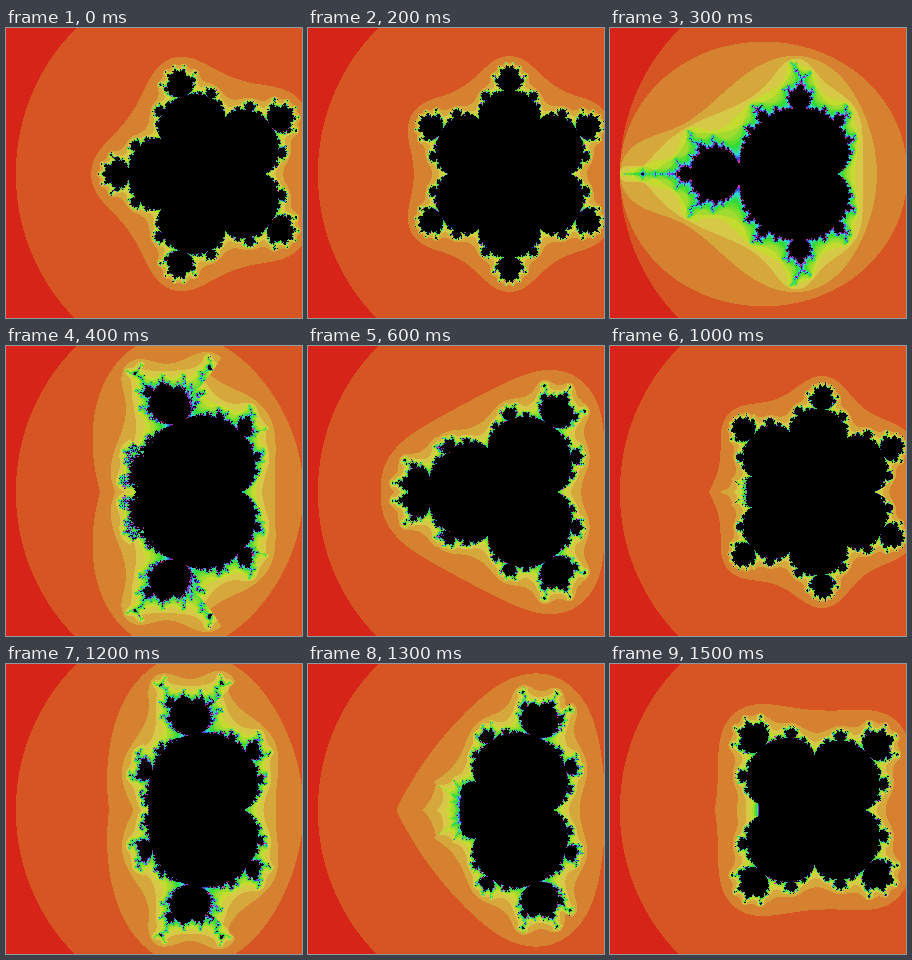
Animation, 296 px wide and 290 px high, one loop 1600 ms. Source, as an HTML page with a canvas:

```html
<!DOCTYPE html>
<html lang="en">
<head>
<meta charset="utf-8">
<title>Multibrot sets</title>
<style>
  html, body { margin: 0; width: 100%; height: 100%; overflow: hidden; background: #000; }
  canvas { display: block; }
</style>
</head>
<body>
<canvas id="stage" width="296" height="290"></canvas>
<script>
const W = 296, H = 290, STEP = 100, LIMIT = 28;
const origin = { x: 201.5, y: 146 };
const scale = { x: 95.8, y: 100 };

// Exponent of z^p + c for each step of the loop
const powers = [6, 6.5, 7, 2, 2.6, 3.32, 4.08, 4.9, 5.75, 6.6, 7.5, 2.2, 2.8, 3.55, 4.33, 5.15];

const ctx = document.getElementById('stage').getContext('2d');
const cache = [];

function hsv(h, s, v) {
  return [5, 3, 1].map(n => {
    const k = (n + h / 60) % 6;
    return Math.round(255 * v * (1 - s * Math.max(0, Math.min(k, 4 - k, 1))));
  });
}

function pack([r, g, b]) {
  return (255 << 24 | b << 16 | g << 8 | r) >>> 0;
}

const palette = Array.from({ length: LIMIT }, (_, n) =>
  pack(hsv((4 + 12.7 * n) % 360, n < 5 ? 0.89 - 0.055 * n : 0.78, n < 5 ? 0.838 : 0.86)));
palette.push(pack([0, 0, 0]));

function escapeTime(cx, cy, p) {
  let x = cx, y = cy;
  for (let n = 0; n < LIMIT; n++) {
    const norm = x * x + y * y;
    if (norm > 4) return n;
    const r = Math.pow(norm, p / 2), a = p * Math.atan2(y, x);
    x = r * Math.cos(a) + cx;
    y = r * Math.sin(a) + cy;
  }
  return LIMIT;
}

function render(p) {
  const image = ctx.createImageData(W, H);
  const pixels = new Uint32Array(image.data.buffer);
  for (let row = 0; row < origin.y; row++) {
    const cy = (origin.y - row - 0.5) / scale.y;
    const mirror = 2 * origin.y - 1 - row;
    for (let col = 0; col < W; col++) {
      const cx = (col + 0.5 - origin.x) / scale.x;
      const color = palette[escapeTime(cx, cy, p)];
      pixels[row * W + col] = color;
      if (mirror < H) pixels[mirror * W + col] = color;
    }
  }
  return image;
}

const start = performance.now();
let shown = -1;

function draw() {
  const elapsed = performance.now() - start;
  const step = Math.floor(elapsed / STEP) % powers.length;
  if (step !== shown) {
    cache[step] ||= render(powers[step]);
    ctx.putImageData(cache[step], 0, 0);
    shown = step;
  }
  requestAnimationFrame(draw);
}
draw();
</script>
</body>
</html>
```
